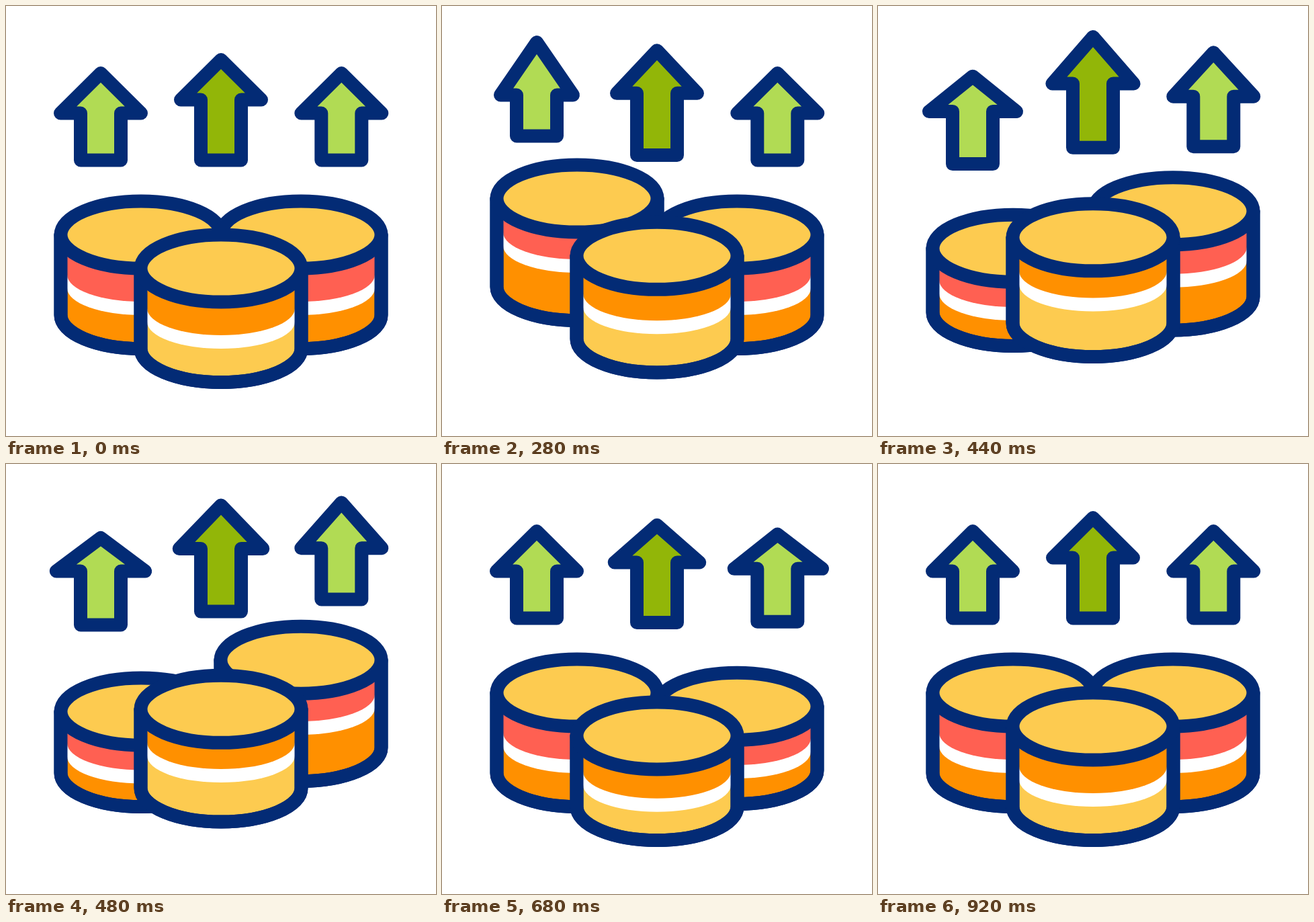
An HTML page with a canvas that plays this animation: 640 px wide and 640 px high, repeating every 1.48 s.

```html
<!DOCTYPE html>
<html lang="en">
<head>
<meta charset="utf-8">
<title>Rising coins</title>
<style>
  html, body { margin: 0; height: 100%; overflow: hidden; background: #fff; }
  canvas { display: block; width: 100vw; height: 100vh; }
</style>
</head>
<body>
<canvas id="stage" width="640" height="640"></canvas>
<script>
const ctx = document.getElementById('stage').getContext('2d');
const LOOP = 1480, STEP = 40;
const NAVY = '#032b75', YELLOW = '#fdcb50', ORANGE = '#ff9000', RED = '#ff6052';
const LIME = '#b1db54', GREEN = '#92b608';

// Each motion pair is [offset when stretched, offset when squashed].
const TOP = [-54, 28], STRIPE = [-63, 15.5], BOTTOM = [-42, 0];

const groups = [
  { delay: 0, coin: { x: 201, y: 340.5, upper: RED, lower: ORANGE },
    arrow: { x: 141, tip: 100, wing: 159.5, fill: LIME,
      move: { tip: [-46, 10], wing: [-27, 0], base: [-36, 10], left: [-6, 6.2], right: [-6, 6.2] } } },
  { delay: 240, coin: { x: 439, y: 340.5, upper: RED, lower: ORANGE },
    arrow: { x: 499.3, tip: 100, wing: 159.5, fill: LIME,
      move: { tip: [-47, 10], wing: [-38, 0], base: [-31, 9], left: [0, 5], right: [0, 7.5] } } },
  { delay: 120, coin: { x: 320, y: 390.5, upper: ORANGE, lower: YELLOW },
    arrow: { x: 320, tip: 80, wing: 139.5, fill: GREEN,
      move: { tip: [-40, 22], wing: [-28, 14], base: [-22, 13], left: [0, 6.5], right: [0, 6.5] } } }
];

const smooth = p => (1 - Math.cos(Math.PI * p)) / 2;

// Rest, stretch at 280 ms, squash at 480 ms, rest at 680 ms.
function offset([up, down], t) {
  if (t <= 80 || t >= 680) return 0;
  if (t < 280) return up * smooth((t - 80) / 200);
  if (t < 480) return up + (down - up) * smooth((t - 280) / 200);
  return down * (1 - smooth(((t - 480) / 200) ** 0.756));
}

function paint(fill, outlined) {
  ctx.fillStyle = fill;
  ctx.fill();
  if (outlined) ctx.stroke();
}

// A tub: straight sides, rounded bottom.
function tub(x, top, bottom, rx, ry) {
  ctx.beginPath();
  ctx.moveTo(x + rx, top);
  ctx.ellipse(x, bottom, rx, ry, 0, 0, Math.PI);
  ctx.lineTo(x - rx, top);
  ctx.closePath();
}

function drawCoin({ x, y, upper, lower }, t) {
  const top = y + offset(TOP, t);
  const stripe = y + 59.5 + offset(STRIPE, t);
  const bottom = y + 119.5 + offset(BOTTOM, t);

  tub(x, top, bottom, 119.5, 50);
  paint(lower, true);
  tub(x, top, stripe + 20, 110, 40);
  paint('#fff');
  tub(x, top, stripe, 110, 40);
  paint(upper);
  tub(x, top, bottom, 119.5, 50);
  ctx.stroke();
  ctx.beginPath();
  ctx.ellipse(x, top, 119.5, 50, 0, 0, 2 * Math.PI);
  paint(YELLOW, true);
}

function drawArrow({ x, tip, wing, fill, move }, t) {
  const top = tip + offset(move.tip, t);
  const mid = wing + offset(move.wing, t);
  const base = 229.5 + offset(move.base, t);

  ctx.beginPath();
  ctx.moveTo(x, top);
  ctx.lineTo(x + 60 + offset(move.right, t), mid);
  ctx.lineTo(x + 30, mid);
  ctx.lineTo(x + 30, base);
  ctx.lineTo(x - 30, base);
  ctx.lineTo(x - 30, mid);
  ctx.lineTo(x - 60 - offset(move.left, t), mid);
  ctx.closePath();
  paint(fill, true);
}

function frame(now) {
  const time = Math.floor((now % LOOP) / STEP) * STEP;
  ctx.fillStyle = '#fff';
  ctx.fillRect(0, 0, 640, 640);
  ctx.strokeStyle = NAVY;
  ctx.lineWidth = 20;
  ctx.lineJoin = 'round';
  for (const { delay, coin, arrow } of groups) {
    drawCoin(coin, time - delay);
    drawArrow(arrow, time - delay);
  }
  requestAnimationFrame(frame);
}
requestAnimationFrame(frame);
</script>
</body>
</html>
```
